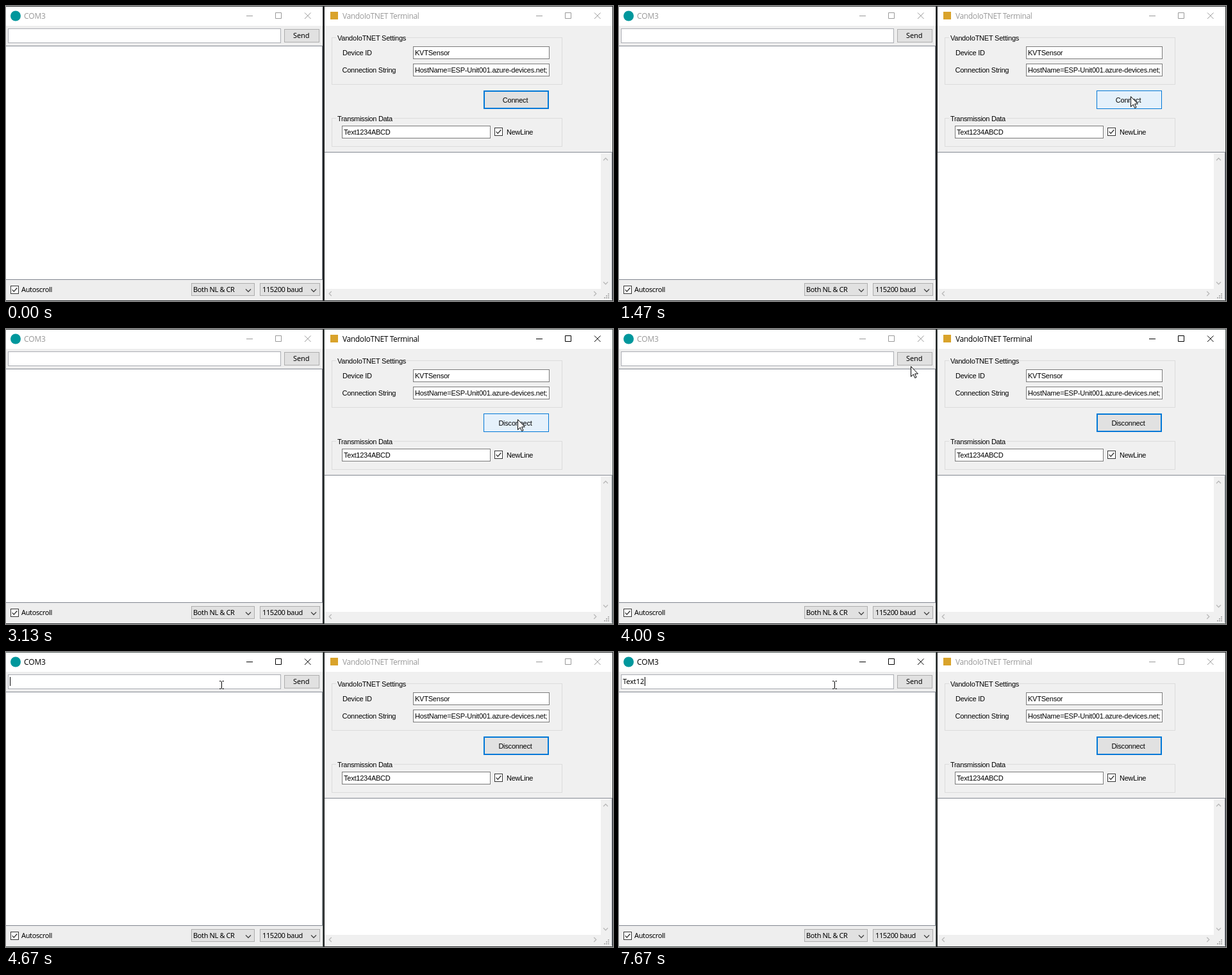
Recreate the animation shown at these times as an HTML page. Size 947 by 461 pixels, loop 8000 ms.

```html
<!DOCTYPE html>
<html lang="en">
<head>
<meta charset="utf-8">
<title>Serial and IoT terminals</title>
<style>
html, body { margin: 0; width: 100%; height: 100%; overflow: hidden; background: #1f2122; }
svg { display: block; }
text { white-space: pre; fill: #000; }
.title { font: 12px "Open Sans", "Noto Sans", sans-serif; }
.left { font: 11px "Noto Sans", sans-serif; letter-spacing: -.38px; }
.entry { font: 11px "Noto Sans", sans-serif; letter-spacing: -.1px; }
.form { font: 11px "Liberation Sans", Arial, sans-serif; letter-spacing: -.22px; }
</style>
</head>
<body>
<svg id="stage" width="947" height="461" viewBox="0 0 947 461"></svg>
<script>
const stage = document.getElementById('stage');

function add(tag, attrs, parent = stage) {
  const el = document.createElementNS('http://www.w3.org/2000/svg', tag);
  for (const key in attrs) el.setAttribute(key, attrs[key]);
  return parent.appendChild(el);
}
function set(el, attrs) {
  for (const key in attrs) el.setAttribute(key, attrs[key]);
}
const fillRect = (x, y, width, height, fill) => add('rect', { x, y, width, height, fill });
// Pixel-aligned box with a 1px border inside the given edges.
const box = (x1, y1, x2, y2, stroke, fill = 'none') =>
  add('rect', { x: x1 + .5, y: y1 + .5, width: x2 - x1 - 1, height: y2 - y1 - 1, stroke, fill });
const line = (d, stroke, width = 1, parent = stage) =>
  add('path', { d, stroke, 'stroke-width': width, fill: 'none' }, parent);
function label(x, y, str, cls = 'form', extra = {}) {
  const el = add('text', { x, y, class: cls, ...extra });
  el.textContent = str;
  return el;
}
function chevron(x, y, turn, stroke, size = 4) {
  const d = `M${-size} ${-size / 2}L0 ${size / 2}L${size} ${-size / 2}`;
  set(line(d, stroke, 1.3), { transform: `translate(${x} ${y}) rotate(${turn})` });
}
function checkbox(x, y) {
  box(x, y, x + 13, y + 13, '#333', '#fff');
  line(`M${x + 2.7} ${y + 6.4}l2.6 2.7l5 -5.6`, '#222', 1.2);
}
function group(x1, y1, x2, y2, str, gap) {
  box(x1, y1, x2, y2, '#dcdcdc');
  fillRect(x1 + 7, y1 - 2, gap, 5, '#f0f0f0');
  return label(x1 + 9, y1 + 5, str);
}
function titleBar(x, name, nameX, spacing, minX) {
  fillRect(x, 1, x ? 449 : 494, 30, '#fff');
  const text = label(nameX, 20, name, 'title', { style: `letter-spacing:${spacing}px` });
  const icons = line(
    `M${minX} 15.5h10M${minX + 45.5} 10.5h9v9h-9zM${minX + 91} 10.5l9.5 9.5m0 -9.5l-9.5 9.5`, '#999');
  return active => {
    text.style.fill = active ? '#000' : '#999';
    set(icons, { stroke: active ? '#000' : '#999' });
  };
}

fillRect(0, 0, 947, 461, '#1f2122');
const leftEdge = line('M0 .5H494.5V460.5H0', '#2c2f30');
const rightEdge = line('M496.5 460.5V.5H946.5V460.5z', '#2c2f30');

// Serial monitor
fillRect(0, 31, 494, 429, '#eee');
const activateLeft = titleBar(0, 'COM3', 28, -.15, 375);
add('circle', { cx: 15, cy: 15.5, r: 8, fill: '#00979c' });
box(3, 35, 429, 58, '#abadb3', '#fff');
box(434, 36, 489, 57, '#adadad', '#e1e1e1');
label(448, 50, 'Send', 'entry');
fillRect(0, 62, 494, 366, '#828790');
fillRect(0, 63, 493, 364, '#fff');
checkbox(7, 437);
label(24, 447, 'Autoscroll', 'left');
box(289, 433, 388, 453, '#adadad', '#e1e1e1');
label(292, 447, 'Both NL & CR', 'left');
chevron(378, 444.5, 0, '#444');
box(396, 433, 490, 453, '#adadad', '#e1e1e1');
label(400, 447, '115200 baud', 'left');
chevron(480, 444.5, 0, '#444');
const typed = label(6, 50, '', 'entry');
const caret = fillRect(6, 39, 1, 14, '#000');

// Device terminal
fillRect(497, 31, 449, 429, '#f0f0f0');
const activateRight = titleBar(497, 'VandoIoTNET Terminal', 525, -.38, 827);
fillRect(506, 9, 12, 12, '#d9a32b');
group(508, 49, 868, 123, 'VandoIoTNET Settings', 110);
label(525, 77, 'Device ID');
box(635, 63, 848, 83, '#7a7a7a', '#fff');
label(638, 77, 'KVTSensor');
label(524.5, 104, 'Connection String');
box(635, 90, 848, 110, '#7a7a7a', '#fff');
label(638, 104, 'HostName=ESP-Unit001.azure-devices.net;');
const button = add('rect', {});
const buttonText = label(794.5, 151, '', 'form', { 'text-anchor': 'middle' });
group(508, 175, 868, 220, 'Transmission Data', 90).style.letterSpacing = '-.32px';
box(524, 187, 756, 207, '#7a7a7a', '#fff');
label(527, 201, 'Text1234ABCD');
checkbox(762, 190);
label(781, 201, 'NewLine');
fillRect(497, 228, 449, 231, '#828790');
fillRect(497, 229, 448, 230, '#fff');
fillRect(928, 230, 17, 229, '#f0f0f0');
fillRect(497, 442, 448, 17, '#f0f0f0');
chevron(935.5, 239.5, 180, '#b8b8b8', 3.5);
chevron(935.5, 433, 0, '#b8b8b8', 3.5);
chevron(506, 449.5, 90, '#b8b8b8', 3.5);
chevron(919, 449.5, 270, '#b8b8b8', 3.5);
for (let row = 0; row < 3; row++)
  for (let col = 2 - row; col < 3; col++)
    fillRect(933 + col * 3, 449 + row * 3, 2, 2, '#b4b4b4');

const arrow = add('path', {
  d: 'M.5 .5V16.4L4.2 12.9L6.7 18.5L9 17.5L6.6 12H11.4Z', fill: '#fff', stroke: '#000'
});
const beam = line('M-3 -5.5H-.5M1.5 -5.5H4M.5 -5V6M-3 6.5H-.5M1.5 6.5H4', '#000');

// Times are in ticks of 1/15 s.
const easeOut = u => 1 - (1 - u) ** 2;
const path = [
  { t: 14, x: 936, y: 190 },
  { t: 22, x: 798, y: 141, ease: easeOut },
  { t: 52, x: 798, y: 141 },
  { t: 60, x: 455, y: 58, ease: u => .4 * u + .6 * u * u * (3 - 2 * u) },
  { t: 65, x: 341, y: 52, ease: easeOut },
  { t: 67, x: 336, y: 51 }
];
const keys = [94, 98, 103, 106, 112, 115];
const caretX = [6, 12, 18, 24, 28, 34, 40];

function pointer(tick) {
  const i = path.findIndex(p => p.t > tick);
  if (i < 0) return path[path.length - 1];
  const a = path[i - 1], b = path[i];
  let u = (tick - a.t) / (b.t - a.t);
  if (b.ease) u = b.ease(u);
  return { x: Math.round(a.x + (b.x - a.x) * u), y: Math.round(a.y + (b.y - a.y) * u) };
}
const show = (el, on) => set(el, { visibility: on ? 'visible' : 'hidden' });

function render(ms) {
  const tick = Math.floor((ms % 8000 + 4) * 15 / 1000);
  const visible = tick >= 14;
  const p = visible ? pointer(tick) : { x: 0, y: 0 };
  const place = { transform: `translate(${p.x} ${p.y})` };
  const overEntry = p.x < 429 && p.y > 35 && p.y < 58;
  set(arrow, place);
  set(beam, place);
  show(arrow, visible && !overEntry);
  show(beam, visible && overEntry);

  const hover = p.x >= 745 && p.x < 847 && p.y >= 132 && p.y < 161;
  const down = tick >= 31 && tick < 33;
  const inset = hover ? .5 : 1;
  set(button, {
    x: 745 + inset, y: 132 + inset, width: 102 - 2 * inset, height: 29 - 2 * inset,
    'stroke-width': 2 * inset,
    stroke: down ? '#005499' : '#0078d7',
    fill: down ? '#cce4f7' : hover ? '#e5f1fb' : '#e1e1e1'
  });
  buttonText.textContent = tick < 47 ? 'Connect' : 'Disconnect';

  const leftOn = tick >= 69, rightOn = tick >= 31 && !leftOn;
  activateLeft(leftOn);
  activateRight(rightOn);
  set(leftEdge, { stroke: leftOn ? '#59625f' : '#2c2f30' });
  set(rightEdge, { stroke: rightOn ? '#59625f' : '#2c2f30' });

  const count = keys.filter(k => tick >= k).length;
  typed.textContent = 'Text12'.slice(0, count);
  set(caret, { x: caretX[count] });
  show(caret, count || tick >= 70 && tick < 78 || tick >= 85 && tick < 93);
}

const start = performance.now();
function loop() {
  render(performance.now() - start);
  requestAnimationFrame(loop);
}
loop();
</script>
</body>
</html>
```
